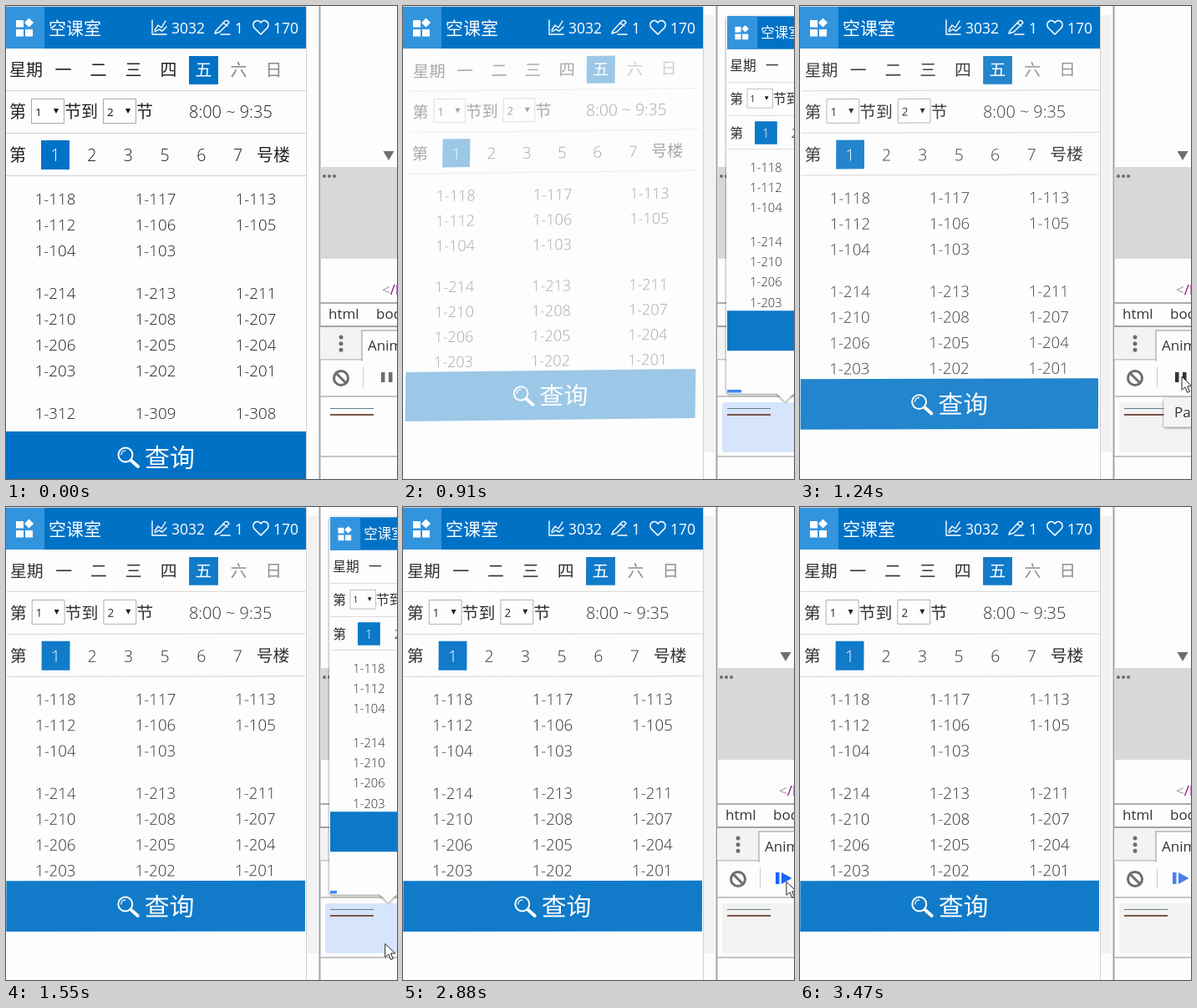
Animation, 468 px wide and 567 px high, one loop 3.83 s. Source, as an HTML page:

```html
<!DOCTYPE html>
<html lang="zh">
<head>
<meta charset="utf-8">
<style>
html, body { margin: 0; width: 100%; height: 100%; overflow: hidden; background: #fdfdfd; }
svg { display: block; }
text { font-family: "Open Sans", "Noto Sans CJK SC", "Noto Sans CJK", sans-serif; white-space: pre; }
.light { font-weight: 300; }
</style>
</head>
<body>
<svg id="stage" width="468" height="567" viewBox="0 0 468 567"></svg>
<script>
const LOOP = 3830;
const BLUE = '#0072c6';
const GRAY = '#6e6e6e';

const rect = (x, y, w, h, fill, extra = '') =>
  `<rect x="${x}" y="${y}" width="${w}" height="${h}" fill="${fill}" ${extra}/>`;
const path = (d, fill, extra = '') => `<path d="${d}" fill="${fill}" ${extra}/>`;
const line = (d, color, width) =>
  path(d, 'none', `stroke="${color}" stroke-width="${width}" stroke-linecap="round" stroke-linejoin="round"`);
const dot = (x, y, r) => `<circle cx="${x}" cy="${y}" r="${r}" fill="${GRAY}"/>`;
// y is the vertical middle of the glyphs
const text = (x, y, s, size, fill = '#222', extra = '') =>
  `<text x="${x}" y="${y + size * 0.365}" font-size="${size}" fill="${fill}" ${extra}>${s}</text>`;
const light = (x, y, s, size = 20, fill = '#222') => text(x, y, s, size, fill, 'class="light"');
const mid = (x, y, s, size = 20, fill = '#222') =>
  text(x, y, s, size, fill, 'class="light" text-anchor="middle"');

function header() {
  return rect(0, 1, 359, 50, BLUE) + rect(0, 1, 46, 50, '#3394de') +
    rect(12, 17, 9, 8.5, '#fff') + rect(12, 28, 9, 8.5, '#fff') + rect(23, 28, 9, 8.5, '#fff') +
    path('M27.5 14.5L33 20L27.5 25.5L22 20Z', '#fff') +
    text(51, 26.5, '空课室', 21, '#fff') +
    line('M175 17V34H192M178 29L182 23L186 26L191 18M178 31L183 28L187 30L192 25', '#fff', 1.4) +
    text(198, 27, '3032', 17.5, '#fff') +
    line('M251 30L262 18Q265 16 267 20L256 31L250 33ZM260 20L265 24M257 34H268', '#fff', 1.4) +
    text(274, 27, '1', 17.5, '#fff') +
    line('M305 34L297 26C293 20 301 14 305 20C309 14 317 20 313 26Z', '#fff', 1.6) +
    text(320, 27, '170', 17.5, '#fff');
}

function picker(x, value) {
  return rect(x + .5, 111.5, 39, 29, '#fff', 'stroke="#aaa"') +
    text(x + 5, 127, value, 13.5, '#111') + path(`M${x + 27} 123h6l-3 6z`, '#111');
}

function rooms() {
  const groups = [
    [231, [118, 117, 113, 112, 106, 105, 104, 103]],
    [344, [214, 213, 211, 210, 208, 207, 206, 205, 204, 203, 202, 201]],
    [488, [312, 309, 308]]
  ];
  return groups.map(([top, list]) => list.map((n, i) =>
    mid(59 + 120 * (i % 3), top + 31 * Math.floor(i / 3), '1-' + n, 18.7)).join('')).join('');
}

function page() {
  const days = [...'一二三四五六日'].map((d, i) =>
    mid(68.5 + 42 * i, 76.5, d, 20, i === 4 ? '#fff' : i > 4 ? '#888' : '#222')).join('');
  const blocks = [1, 2, 3, 5, 6, 7].map((n, i) =>
    mid(59 + 43.7 * i, 179, n, 19.5, i ? '#222' : '#fff')).join('');
  const rules = [101, 152, 203].map(y => rect(0, y, 359, 1, '#d0d0d0')).join('');
  return rules + rect(219, 60, 35, 34, BLUE) + rect(42, 161, 34, 35, BLUE) +
    light(4, 76.5, '星期') + days +
    light(4, 127, '第') + picker(30, 1) + light(70, 127, '节到') + picker(116, 2) + light(156, 127, '节') +
    light(219, 127, '8:00 ~ 9:35') +
    light(4, 178.5, '第') + blocks + light(300, 178.5, '号楼') + rooms() +
    `<g id="footer">${rect(0, 0, 359, 61, BLUE)}
      <circle cx="143" cy="28" r="8.5" fill="none" stroke="#fff" stroke-width="2"/>
      ${line('M138 28Q138 23 143 23', '#fff', 1.2)}${line('M150 35L158 42', '#fff', 4)}
      ${light(166, 31, '查询', 30, '#fff')}</g>`;
}

function inspector() {
  return rect(374.5, 0, 2, 567, '#a3a3a3') +
    path('M451.500 174H464.500L458 185Z', GRAY) + rect(376, 193, 92, 110, '#d8d8d8') +
    [381, 387, 393].map(x => dot(x, 204, 2)).join('') +
    text(450, 340, '&lt;<tspan fill="#881280">/body&gt;</tspan>', 17, '#a894a6') +
    rect(376, 355, 92, 2, '#ababab') + text(386, 369, 'html', 17, '#333') + text(443, 369, 'body', 17, '#333') +
    rect(376, 383, 92, 2, '#a3a3a3') + rect(376, 385, 92, 39, '#f3f3f3') + rect(376, 423, 92, 1.5, '#c4c4c4') +
    rect(426, 389, 60, 36, '#fdfdfd', 'stroke="#b5b5b5" stroke-width="1.5"') + rect(427, 423, 42, 3, '#fdfdfd') +
    text(433, 406.5, 'Animations', 17, '#333') +
    [397, 404.700, 412.300].map(y => dot(401, y, 2.5)).join('') +
    `<circle cx="401" cy="446" r="8.500" fill="none" stroke="${GRAY}" stroke-width="3"/>` +
    line('M395 440L407 452', GRAY, 3) + rect(427, 433, 1, 24, '#ccc') +
    rect(376, 467, 92, 2, '#c4c4c4') + rect(376, 539, 92, 2, '#c4c4c4') +
    rect(382, 475, 100, 60, '#f2f2f2', 'id="panel" rx="4"') +
    rect(388, 482, 52, 1, '#607d8b') + rect(388, 489, 52, 2, '#795548') +
    path('M449 439h4.500v12h-4.500zM458 439h4.500v12h-4.500z', GRAY, 'id="pause"') +
    path('M446 438h4.500v14h-4.500zM453 438L465.500 445L453 452Z', GRAY, 'id="resume"');
}

function popover() {
  return `<g id="popover">
    <g filter="url(#shadow)">${rect(387, 11.5, 120, 453, '#fdfdfd', 'rx="4"')}
    ${path('M447 464L457.500 474L468 464Z', '#fdfdfd')}</g>
    <g transform="translate(388 11.500) scale(.787)"><use href="#header"/><use href="#page" opacity=".95"/></g>
    ${rect(388, 460, 17, 3.5, '#4285f4', 'id="progress"')}</g>`;
}

document.getElementById('stage').innerHTML = `
  <defs><filter id="shadow"><feDropShadow dx="0" dy="1" stdDeviation="1.5" flood-opacity=".55"/></filter></defs>
  ${rect(0, 0, 468, 567, '#fdfdfd')}
  ${rect(360, 11, 13, 524, '#f2f2f2', 'id="track"')}
  <g id="mover"><g id="page">${page()}</g></g>
  ${rect(0, 0, 360, 1, '#d0d0d0')}<g id="header">${header()}</g>
  ${rect(359, 0, 1, 567, '#d0d0d0')}
  ${inspector()}${popover()}
  <g id="tooltip"><g filter="url(#shadow)">${rect(435.5, 469.5, 80, 35, '#f4f4f4', 'rx="2"')}</g>
    ${text(448, 487, 'Pause', 17, '#333')}</g>
  <g id="cursor">${path('M0 0V16L4 12.500L6.800 19L9.500 17.800L6.700 11.500H12Z', '#fff', 'stroke="#222" stroke-width="1"')}</g>`;

const el = {};
document.querySelectorAll('#stage [id]').forEach(n => el[n.id] = n);
const show = (node, on) => node.setAttribute('display', on ? 'inline' : 'none');
const within = (t, a, b) => t >= a && t < b;

function along(t, keys) {
  let i = 1;
  while (i < keys.length - 1 && t > keys[i][0]) i++;
  const [a, b] = [keys[i - 1], keys[i]];
  const k = Math.min(1, Math.max(0, (t - a[0]) / (b[0] - a[0])));
  return [a[1] + (b[1] - a[1]) * k, a[2] + (b[2] - a[2]) * k];
}

function cursorAt(t) {
  if (within(t, 1060, 1650)) return along(t, [[1060, 466, 500], [1170, 457, 444], [1390, 457, 445], [1640, 452, 567]]);
  if (within(t, 2160, 2690)) return along(t, [[2160, 452, 559], [2480, 460, 455], [2600, 448, 450], [2690, 425, 446]]);
  if (within(t, 2690, 3230)) {
    const a = 2 * Math.PI * (t - 2850) / 340;
    return [443 + 19 * Math.cos(a), 445 + 8 * Math.sin(a)];
  }
  if (within(t, 3230, 3470)) return along(t, [[3230, 458, 452], [3460, 455, 567]]);
  return null;
}

function render(t) {
  const started = t >= 770;
  const paused = t >= 1346;
  const k = Math.max(0, (Math.min(t, 1346) - 765) / 988);
  const opacity = t < 650 ? 1 : started ? 1 - (1 - k) ** 3 : 0;
  const u = t < 650 ? 0 : (1 - opacity) / 0.62;
  const scale = 1 - 0.033 * u;
  el.mover.setAttribute('transform',
    `matrix(${scale} ${-0.0115 * u} ${-0.013 * u} ${scale} ${9.1 * u} ${4.4 * u})`);
  el.mover.setAttribute('opacity', opacity);
  el.footer.setAttribute('transform', `translate(0 ${t < 650 ? 510 : 449.5})`);

  const pos = cursorAt(t);
  show(el.cursor, pos);
  if (pos) el.cursor.setAttribute('transform', `translate(${pos[0]} ${pos[1]})`);
  const overButton = pos && pos[0] > 440 && within(pos[1], 430, 462);
  const overPanel = within(t, 800, 1100) || pos && within(pos[1], 474, 535);

  show(el.track, started);
  show(el.panel, started);
  el.panel.setAttribute('fill', overPanel ? '#d6e4fc' : '#f2f2f2');
  show(el.popover, within(t, 830, 1130) || within(t, 1550, 1640) || within(t, 3330, 3450));
  el.progress.setAttribute('width', Math.max(8, 17 + (t % 1500 - 910) * 0.05));
  show(el.tooltip, within(t, 1210, 1390));
  show(el.pause, !paused);
  show(el.resume, paused);
  el.pause.setAttribute('fill', overButton ? '#333' : GRAY);
  el.resume.setAttribute('fill', overButton ? '#1a66ff' : '#4a80e8');
}

const start = performance.now();
function tick() {
  render((performance.now() - start) % LOOP);
  requestAnimationFrame(tick);
}
tick();
</script>
</body>
</html>
```
